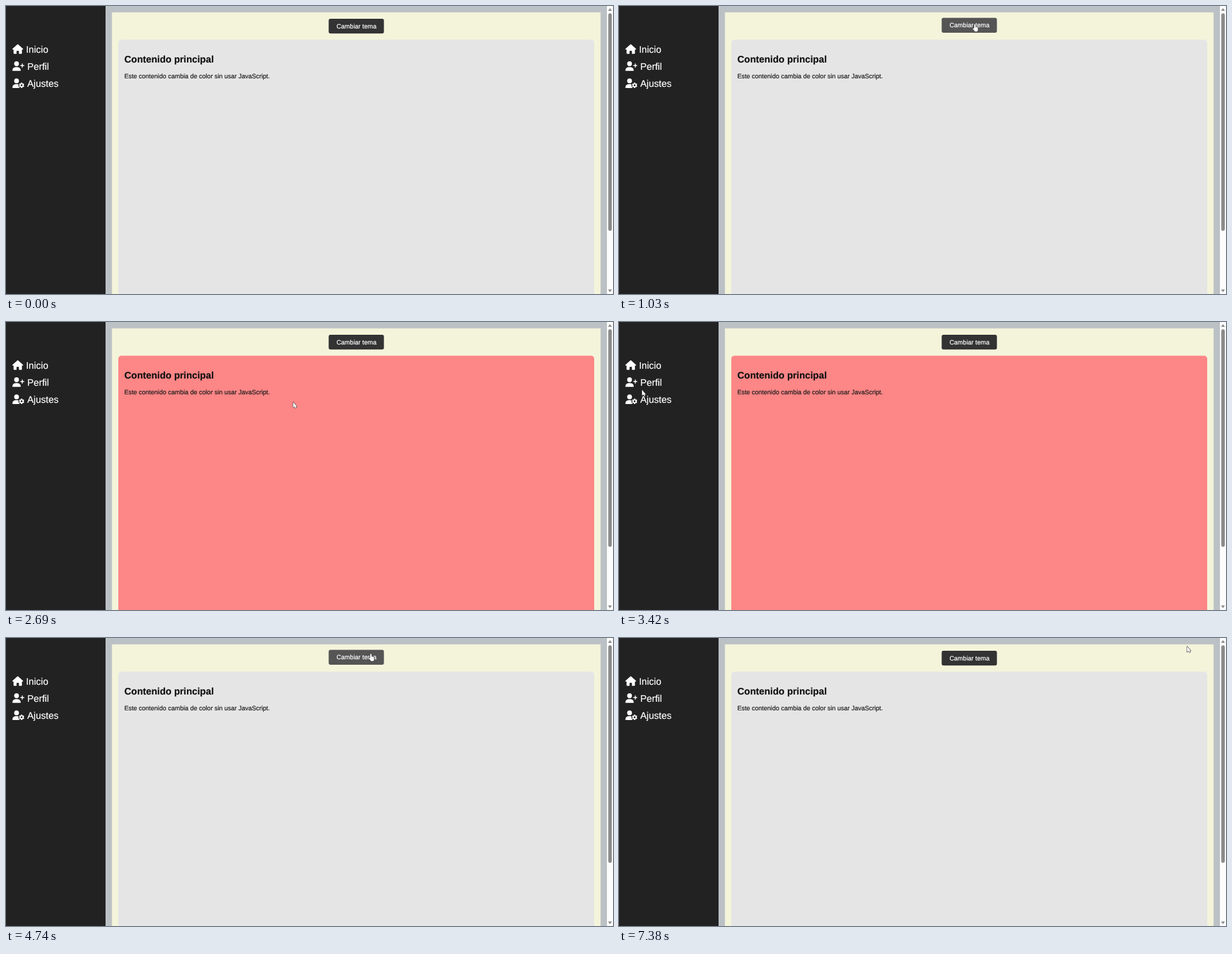
Animation, 1000 px wide and 474 px high, one loop 8 s. Source, as an HTML page with a canvas:

```html
<!DOCTYPE html>
<html lang="es">
<head>
<meta charset="utf-8">
<title>Cambiar tema</title>
<style>
html, body { margin: 0; width: 100%; height: 100%; overflow: hidden; background: #222; }
canvas { display: block; width: 1000px; height: 474px; }
</style>
</head>
<body>
<canvas id="stage" width="1000" height="474"></canvas>
<script>
const ctx = document.getElementById('stage').getContext('2d');
const LOOP = 8000;
const RED_FROM = 2120, RED_TO = 4740;
const W = 1000, H = 474;
const SIDE = 164, BAR = 990, GAP = 10.5;
const SMALL = 10.5, LARGE = 15.75;
const UNIT = LARGE / 512;
const DARK = '#222222', WHITE = '#ffffff', GREY = '#8b8b8b';
const BUTTON = { x: 531.6, y: 21, w: 91, h: 24.3 };

// Each move eases the pointer to a new spot; sag bows the way downwards
const ENTRY = { x: 985, y: 330 };
const MOVES = [
  { from: 360, to: 1030, x: 586, y: 30, sag: 0 },
  { from: 2440, to: 3300, x: 38, y: 112, sag: 130 },
  { from: 3420, to: 4150, x: 601, y: 26, sag: 120 },
  { from: 4750, to: 5560, x: 936, y: 14, sag: 30 }
];

const clamp = v => Math.max(0, Math.min(1, v));
const ease = v => v * v * (3 - 2 * v);

function pointerAt(t) {
  let { x, y } = ENTRY;
  for (const m of MOVES) {
    const k = ease(clamp((t - m.from) / (m.to - m.from)));
    x += (m.x - x) * k;
    y += (m.y - y) * k + m.sag * 4 * k * (1 - k);
    if (k < 1) break;
  }
  return { x, y };
}

function onButton({ x, y }) {
  const { x: bx, y: by, w, h } = BUTTON;
  return x > bx && x < bx + w && y > by - 2 && y < by + h;
}

// Share of the last 100 ms spent over the button
function hoverAt(t) {
  const steps = 10;
  let n = 0;
  for (let i = 0; i < steps; i++) n += onButton(pointerAt(t - i * 10));
  return n / steps;
}

function rect(x, y, w, h, color, r = 0) {
  ctx.fillStyle = color;
  ctx.beginPath();
  ctx.roundRect(x, y, w, h, r);
  ctx.fill();
}

function disc(x, y, r, color) {
  rect(x - r, y - r, 2 * r, 2 * r, color, r);
}

function text(str, x, y, size, color, weight = 'normal') {
  ctx.font = `${weight} ${size}px "Liberation Sans", Arial, sans-serif`;
  ctx.fillStyle = ctx.strokeStyle = color;
  ctx.lineWidth = 0.2;
  ctx.fillText(str, x, y);
  ctx.strokeText(str, x, y);
}

// Icons are drawn on a grid 512 units high
function house() {
  ctx.lineWidth = 64;
  ctx.lineJoin = 'round';
  ctx.strokeStyle = WHITE;
  ctx.beginPath();
  ctx.moveTo(32, 256);
  ctx.lineTo(288, 34);
  ctx.lineTo(544, 256);
  ctx.closePath();
  ctx.fill();
  ctx.stroke();
  rect(64, 240, 448, 272, WHITE, 40);
  rect(224, 352, 128, 168, DARK, [32, 32, 0, 0]);
}

function person() {
  disc(224, 128, 128, WHITE);
  rect(0, 304, 448, 208, WHITE, [178, 178, 30, 30]);
}

function userPlus() {
  person();
  rect(416, 200, 224, 48, WHITE, 24);
  rect(504, 112, 48, 224, WHITE, 24);
}

function userGear() {
  person();
  ctx.translate(496, 368);
  disc(0, 0, 172, DARK);
  disc(0, 0, 108, WHITE);
  for (let i = 0; i < 6; i++) {
    rect(-36, -144, 72, 100, WHITE, 14);
    ctx.rotate(Math.PI / 3);
  }
  disc(0, 0, 48, DARK);
}

const MENU = [
  { label: 'Inicio', icon: house, width: 576 },
  { label: 'Perfil', icon: userPlus, width: 640 },
  { label: 'Ajustes', icon: userGear, width: 640 }
];

function sidebar() {
  rect(0, 0, SIDE, H, DARK);
  MENU.forEach(({ label, icon, width }, i) => {
    const y = 63 + i * 28.1;
    ctx.save();
    ctx.translate(GAP, y);
    ctx.scale(UNIT, UNIT);
    ctx.fillStyle = WHITE;
    icon();
    ctx.restore();
    text(label, GAP + width * UNIT + 4.7, y + 13.5, LARGE, WHITE);
  });
}

function triangle(y, tip) {
  ctx.fillStyle = GREY;
  ctx.beginPath();
  ctx.moveTo(991.8, y);
  ctx.lineTo(995, y + tip);
  ctx.lineTo(998.2, y);
  ctx.fill();
}

function scrollbar() {
  rect(BAR, 0, W - BAR, H, '#fcfcfc');
  rect(992.2, 12, 5.8, 358, GREY, 2.9);
  triangle(8, -4.5);
  triangle(466.5, 4.5);
}

function button(hover) {
  const { x, y, w, h } = BUTTON;
  const lift = 1.4 * hover, g = Math.round(51 + 34 * hover);
  rect(x, y - lift, w, h, `rgb(${g},${g},${g})`, 3);
  text('Cambiar tema', x + 12.8, y + 15.7 - lift, SMALL, WHITE);
}

function page(t) {
  const right = BAR - GAP;
  rect(0, 0, W, H, '#bbc1c4');
  rect(SIDE + GAP, GAP, right - SIDE - GAP, H, '#f4f4db');
  const x = SIDE + 2 * GAP;
  const color = t >= RED_FROM && t < RED_TO ? '#fd8686' : '#e5e5e5';
  rect(x, 55.5, right - GAP - x, H, color, 5);
  text('Contenido principal', x + 10, 93.1, LARGE - 0.05, '#111', 'bold');
  text('Este contenido cambia de color sin usar JavaScript.', x + 10, 119.1, SMALL - 0.05, '#1c1c1c');
}

const ARROW = new Path2D('M0 0V9L2 7L4 10L5 9L4 7H6Z');
const HAND = new Path2D();
HAND.roundRect(-0.8, 0, 2, 8, 1);
HAND.roundRect(-0.8, 4.8, 6, 7.2, 2);
HAND.roundRect(-2.8, 6.5, 4, 3, 1.4);

function pointer(p) {
  const shape = onButton(p) ? HAND : ARROW;
  ctx.save();
  ctx.translate(p.x, p.y);
  ctx.lineWidth = 1.3;
  ctx.lineJoin = 'round';
  ctx.strokeStyle = '#444';
  ctx.fillStyle = WHITE;
  ctx.stroke(shape);
  ctx.fill(shape);
  ctx.restore();
}

function draw(t) {
  page(t);
  button(hoverAt(t));
  sidebar();
  scrollbar();
  if (t >= MOVES[0].from) pointer(pointerAt(t));
}

ctx.textRendering = 'geometricPrecision';
const start = performance.now();
function tick() {
  draw((performance.now() - start) % LOOP);
  requestAnimationFrame(tick);
}
tick();
</script>
</body>
</html>
```
